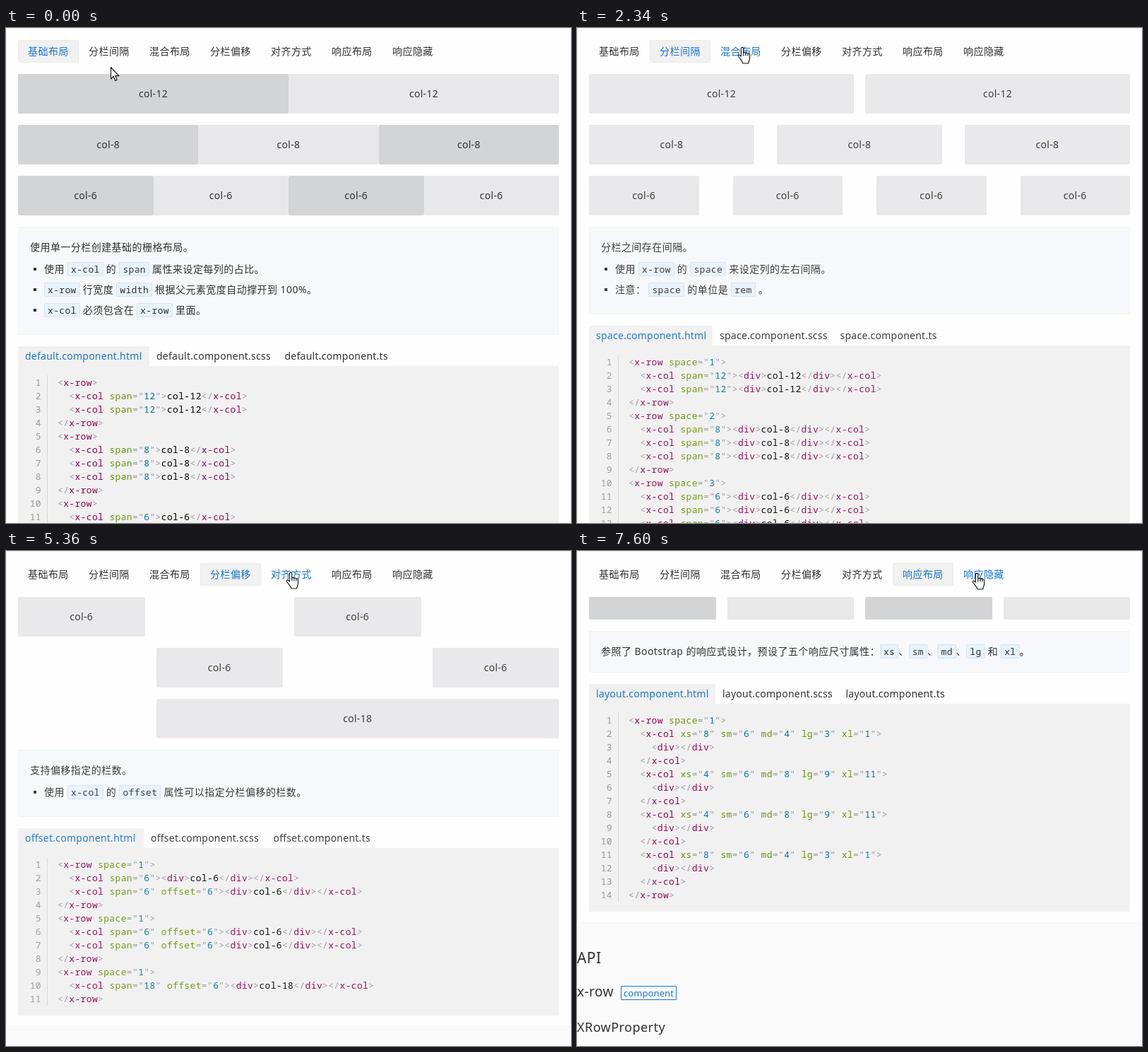
Animation of 800 by 700 pixels, one loop 8 s. Source, as an HTML page:

```html
<!DOCTYPE html>
<html lang="zh-CN">
<head>
<meta charset="utf-8">
<title>Grid layout</title>
<style>
html, body { margin: 0; width: 100%; height: 100%; overflow: hidden; background: #fafafa; }
#stage { position: relative; width: 800px; height: 700px; overflow: hidden; background: #fafafa;
  color: #333; font: 14px "Noto Sans", "Noto Sans CJK SC", "Noto Sans CJK", sans-serif; }
#stage div, #stage pre, #stage ul, #stage p, #cursor { position: absolute; box-sizing: border-box; margin: 0; padding: 0; }
#card { left: 0; top: 0; width: 800px; overflow: hidden; background: #fefefe; }
#edge { inset: 0; border: 1px solid #f1f1f4; }
#thumb { top: 17px; width: 86px; height: 32px; background: #f1f1f1; border: 1px solid #eaeaec; border-radius: 2px; }
#stage .tab { top: 17px; width: 86px; line-height: 32px; padding-left: 14px; letter-spacing: .45px; white-space: nowrap; }
.page { left: 0; top: 0; width: 800px; height: 1200px; }
.col { text-align: center; letter-spacing: .3px; border-radius: 2px; }
.doc { left: 17px; width: 766px; background: #f6f8fc; border: 1px solid #f1f4f9; letter-spacing: .45px; }
#stage .doc p { left: 16px; top: 15px; line-height: 26px; white-space: nowrap; }
.doc ul { left: 36px; width: 712px; list-style: none; line-height: 29px; }
.doc li { position: relative; }
.doc li::before { content: ""; position: absolute; left: -15px; top: 13px; width: 4px; height: 4px; background: #333; }
.doc code { font-size: 13px; line-height: 1; padding: 0 4px; background: #e8f2fb; border: 1px solid #d2e6f7; border-radius: 2px; }
code, pre { font-family: "Noto Sans Mono", "DejaVu Sans Mono", monospace; letter-spacing: .35px; }
.files { height: 28px; line-height: 28px; padding-left: 10px !important; letter-spacing: .25px; white-space: nowrap; }
#stage .files.on { color: #1976d2; background: #f1f1f1; border-radius: 2px 2px 0 0; }
#stage .files { padding-left: 10px; }
.code { left: 17px; width: 766px; background: #f1f1f1; }
.code pre { top: 14px; font-size: 13px; line-height: 19px; }
#stage .nums { left: 0; width: 33px; text-align: right; color: #999; }
#stage .rule { left: 41px; top: 13px; bottom: 14px; width: 1px; background: #d8d8dc; }
#stage .src { left: 56px; color: #000; }
.src i { font-style: normal; }
.p { color: #999; } .t { color: #905; } .a { color: #690; } .v { color: #07a; }
#foot { left: 0; width: 800px; height: 180px; letter-spacing: .45px; white-space: nowrap; }
#foot div { left: 0; line-height: 30px; }
#stage #badge { left: 62px; top: 89px; width: 79px; height: 20px; line-height: 18px; text-align: center;
  font-size: 13px; letter-spacing: .1px; color: #1976d2; border: 1px solid #1976d2; border-radius: 1px; }
#cursor { left: 0; top: 0; width: 800px; height: 700px; }
</style>
</head>
<body>
<div id="stage">
  <div id="foot">
    <div style="top:34px;font-size:21px">API</div>
    <div style="top:82px;font-size:19px">x-row</div>
    <div id="badge">component</div>
    <div style="top:132px;font-size:18px">XRowProperty</div>
  </div>
  <div id="card"><div id="edge"></div><div id="thumb"></div></div>
  <svg id="cursor" fill="#fff" stroke="#111" stroke-width="1.1" stroke-linejoin="round">
    <path id="arrow" d="M.5 .5V17L4.2 13.4 6.8 19.5 9.2 18.4 6.7 12.6H11.8Z"/>
    <path id="hand" d="M-1.6 13.5V2.1a1.7 1.7 0 0 1 3.4 0V8.5c.5-1.2 3-1.2 3.2.3 .5-1 2.9-.8 3 .6 .7-.8 2.6-.4 2.6 1.2V15.5c0 3-1.8 4-1.8 7.5H.8C.4 19.5-4 16-5.5 13c-.8-1.8 1.5-2.6 2.6-1.2L-1.6 13.5M1.8 8.5v4M5 8.8v3.7M8 9.4v3.1"/>
  </svg>
</div>
<script>
const BLUE = '#1976d2', PALE = '#e8e8ea', DARK = '#d3d4d6';
const $ = id => document.getElementById(id);
const clamp = x => Math.max(0, Math.min(1, x));
const easeOut = (x, n) => 1 - (1 - clamp(x)) ** n;

const tabNames = ['基础布局', '分栏间隔', '混合布局', '分栏偏移', '对齐方式', '响应布局', '响应隐藏'];

// A row is spans with an optional "@offset"; space is the gutter in rem.
const row = (cols, space = 0, more = {}) => ({ cols, space, ...more });
const flexRow = (justify, x, pitch = 191.5) => row('6 6 6', 0, { justify, x, pitch });

const sizes = values => {
  const keys = ['xs', 'sm', 'md', 'lg', 'xl'];
  return ['  <x-col ' + keys.map((k, i) => `${k}="${values[i]}"`).join(' ') + '>', '    <div></div>', '  </x-col>'];
};
const outer = sizes([8, 6, 4, 3, 1]), inner = sizes([4, 6, 8, 9, 11]);

const pages = [
  { name: 'default', fileWidth: 186, striped: true, plain: true,
    rows: [row('12 12'), row('8 8 8'), row('6 6 6 6')],
    doc: ['使用单一分栏创建基础的栅格布局。',
      '使用 `x-col` 的 `span` 属性来设定每列的占比。',
      '`x-row` 行宽度 `width` 根据父元素宽度自动撑开到 100%。',
      '`x-col` 必须包含在 `x-row` 里面。'] },
  { name: 'space', fileWidth: 175,
    rows: [row('12 12', 1), row('8 8 8', 2), row('6 6 6 6', 3)],
    doc: ['分栏之间存在间隔。',
      '使用 `x-row` 的 `space` 来设定列的左右间隔。',
      '注意： `space` 的单位是 `rem` 。'] },
  { name: 'hybrid', fileWidth: 179,
    rows: [row('16 8', 1), row('8 8 4 4', 1), row('4 16 4', 1)],
    doc: ['通过不同的分栏组合形成混合布局。'] },
  { name: 'offset', fileWidth: 178,
    rows: [row('6 6@6', 1), row('6@6 6@6', 1), row('18@6', 1)],
    doc: ['支持偏移指定的栏数。',
      '使用 `x-col` 的 `offset` 属性可以指定分栏偏移的栏数。'] },
  { name: 'flex', fileWidth: 163, striped: true,
    rows: [flexRow('start', 17), flexRow('end', 208.5), flexRow('center', 112.75),
      flexRow('space-between', 74.4, 229.8), flexRow('space-around', 64.9, 239.4)],
    doc: ['通过 `flex` 布局来对分栏进行灵活的排版对齐。',
      '使用 `x-row` 的 `justify` 或 `align` 属性，可以启用 `flex` 布局。',
      '`justify` 定义子元素的排版方式，可用的值 `start`， `center`， `end`， `space-between`， `space-around`。',
      '`align` 定义子元素的对齐方式，可用的值 `top`， `middle`， `bottom`。'],
    docLines: 4 },
  { name: 'layout', fileWidth: 179, striped: true, rowHeight: 32,
    rows: [row('6 6 6 6', 1)],
    doc: ['参照了 Bootstrap 的响应式设计，预设了五个响应尺寸属性：`xs`、`sm`、`md`、`lg` 和 `xl`。'],
    code: ['<x-row space="1">', ...outer, ...inner, ...inner, ...outer, '</x-row>'] }
];

const parseCols = r => r.cols.split(' ').map(c => c.split('@').map(Number));

function rowCode(r, plain) {
  const attr = r.justify ? ` justify="${r.justify}"` : r.space ? ` space="${r.space}"` : '';
  const cols = parseCols(r).map(([span, offset]) => {
    const label = plain ? `col-${span}` : `<div>col-${span}</div>`;
    return `  <x-col span="${span}"${offset ? ` offset="${offset}"` : ''}>${label}</x-col>`;
  });
  return [`<x-row${attr}>`, ...cols, '</x-row>'];
}

const paint = (cls, s) => `<i class="${cls}">${s}</i>`;
const highlight = line => line.replace(/(<\/?)([\w-]+)|([\w-]+)="([^"]*)"|>/g, (all, open, tag, attr, value) =>
  tag ? paint('p', open.replace('<', '&lt;')) + paint('t', tag)
  : attr ? paint('a', attr) + paint('p', '="') + paint('v', value) + paint('p', '"')
  : paint('p', '&gt;'));

function rowHtml(r, top, page) {
  const gap = r.space * 16, unit = (766 + gap) / 24, h = page.rowHeight || 56;
  let at = 0;
  return parseCols(r).map(([span, offset = 0], i) => {
    at += offset;
    const x = r.pitch ? r.x + i * r.pitch : 17 + at * unit;
    at += span;
    const fill = page.striped && i % 2 === 0 ? DARK : PALE;
    return `<div class="col" style="left:${x}px;top:${top}px;width:${span * unit - gap}px;height:${h}px;` +
      `line-height:${h}px;background:${fill}">${page.rowHeight ? '' : 'col-' + span}</div>`;
  }).join('');
}

// The scss tab is slightly narrower than the html tab.
function filesHtml({ name, fileWidth: w }, top) {
  return ['html', 'scss', 'ts'].map((ext, i) =>
    `<div class="files${i ? '' : ' on'}" style="left:${[17, 17 + w, 12.5 + 2 * w][i]}px;top:${top}px;width:${w}px">` +
    `${name}.component.${ext}</div>`).join('');
}

function buildPage(page) {
  const step = (page.rowHeight || 56) + 16;
  const docTop = 65 + step * page.rows.length;
  const [intro, ...items] = page.doc.map(s => s.replace(/`([^`]+)`/g, '<code>$1</code>'));
  const introH = intro.includes('<code>') ? 27 : 26;
  const lines = page.docLines || items.length;
  const docH = 32 + introH + (lines ? 8 + 29 * lines : 0);
  const fileTop = docTop + docH + 16, codeTop = fileTop + 28;
  const code = page.code || page.rows.flatMap(r => rowCode(r, page.plain));
  const codeH = 28 + 19 * code.length;
  const el = document.createElement('div');
  el.className = 'page';
  el.innerHTML = page.rows.map((r, i) => rowHtml(r, 65 + step * i, page)).join('') +
    `<div class="doc" style="top:${docTop}px;height:${docH}px"><p>${intro}</p>` +
    `<ul style="top:${17.5 + introH}px">${items.map(s => `<li>${s}</li>`).join('')}</ul></div>` +
    filesHtml(page, fileTop) +
    `<div class="code" style="top:${codeTop}px;height:${codeH}px">` +
    `<pre class="nums">${code.map((_, i) => i + 1).join('\n')}</pre><div class="rule"></div>` +
    `<pre class="src">${code.map(highlight).join('\n')}</pre></div>`;
  $('card').append(el);
  return { el, height: codeTop + codeH + 16 };
}

const views = pages.map(buildPage);
const tabs = tabNames.map((name, i) => {
  const el = document.createElement('div');
  el.className = 'tab';
  el.style.left = 17 + 86 * i + 'px';
  el.textContent = name;
  $('card').append(el);
  return el;
});

// Bursts of motion: start, end, number of steps.
const bursts = [[400, 560, 3], [710, 1180, 7], [1560, 1640, 2], [2340, 3040, 10],
  [3260, 3350, 2], [4030, 4650, 9], [5360, 5960, 9], [6820, 7600, 11]];
const switches = [710, 2340, 4030, 5360, 6820];
const path = [[0, 148, 55], [320, 148, 55], [560, 152, 38], [790, 152, 38], [945, 221, 31], [1180, 227, 30],
  [1482, 227, 30], [1640, 234, 27], [2730, 234, 27], [3040, 345, 27], [3182, 345, 27], [3340, 338, 28],
  [4340, 338, 28], [4650, 403, 30], [5670, 403, 30], [5960, 486, 33], [7130, 486, 33], [7600, 566, 31]];
const LEAVE = 155;

function snap(t) {
  const burst = bursts.filter(b => b[0] <= t).pop();
  if (!burst) return 0;
  const [start, end, steps] = burst, dt = (end - start) / (steps - 1);
  return start + dt * Math.min(steps - 1, Math.floor((t - start + 10) / dt));
}

function pointer(t) {
  const i = path.findIndex(k => k[0] > t);
  if (i < 0) return path[path.length - 1].slice(1);
  if (i === 0) return path[0].slice(1);
  const [t0, x0, y0] = path[i - 1], [t1, x1, y1] = path[i], p = (t - t0) / (t1 - t0);
  return [x0 + (x1 - x0) * p, y0 + (y1 - y0) * p];
}

function draw(t) {
  const now = snap(t);
  const next = switches.filter(s => s <= now).length;
  const dt = next ? now - switches[next - 1] : 1e6;
  const leaving = dt < LEAVE;
  const shown = leaving ? next - 1 : next;
  const p = clamp((dt - LEAVE) / 260);

  views.forEach(({ el }, i) => {
    el.style.display = i === shown ? '' : 'none';
    if (i !== shown) return;
    el.style.opacity = leaving ? clamp(1 - (dt + 10) / LEAVE) : easeOut(p, 5);
    el.style.transform = leaving || p === 1 ? 'none' : `translateX(${Math.round(806 * (1 - easeOut(p, 2)))}px)`;
  });
  $('card').style.height = $('foot').style.top = views[shown].height + 'px';

  const slide = next - 1 + easeOut((dt - LEAVE) / 120, 3);
  $('thumb').style.left = 17 + 86 * slide + 'px';

  const [hx, hy] = pointer(now - 78);
  const hover = hy < 49 ? Math.floor((hx - 17) / 86) : -1;
  const active = dt < 200 ? next - 1 : next;
  const fading = dt > 140 && dt < 200;
  tabs.forEach((el, i) => {
    el.style.color = fading && i === next ? '#64a5e4' : i === active || i === hover ? BLUE : '#333';
  });

  const [x, y] = pointer(now), hand = y < 49;
  $('arrow').style.display = hand ? 'none' : '';
  $('hand').style.display = hand ? '' : 'none';
  $(hand ? 'hand' : 'arrow').setAttribute('transform', `translate(${x} ${y})`);
}

const begin = performance.now();
function loop() {
  draw((performance.now() - begin) % 8000);
  requestAnimationFrame(loop);
}
loop();
</script>
</body>
</html>
```
